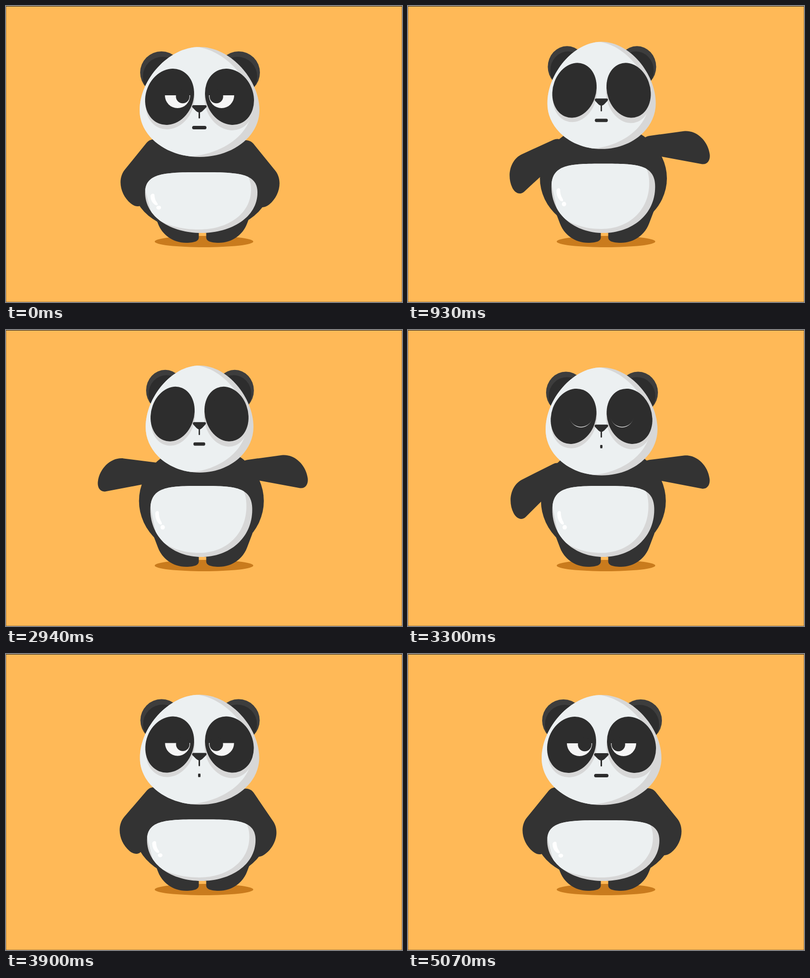
An HTML page for the animation above (6.3 s loop, 800x600 px).

```html
<!DOCTYPE html>
<html lang="en">
<head>
<meta charset="utf-8">
<title>Panda</title>
<style>
  html, body { margin: 0; width: 100%; height: 100%; overflow: hidden; background: #ffb957; }
  svg { display: block; width: 800px; height: 600px; }
  .body { fill: #333; }
  .dark { fill: #2d2d2d; }
  .rim { fill: #3d3d3d; }
  .light { fill: #ecf0f1; }
  .white { fill: #f5f5f5; }
  .shade { fill: #d7d7d7; }
</style>
</head>
<body>
<svg viewBox="0 0 800 600">
  <defs>
    <path id="skull" d="M391 83C328 83 270 150 270 211C270 264 324 306 391 306S512 264 512 211C512 150 454 83 391 83Z"/>
    <path id="tummy" d="M394.5 337C322 337 281 338 281 378C281 428 333 460 394.5 460S508 428 508 378C508 338 467 337 394.5 337Z"/>
    <path id="leg" d="M296 412L307 441C315 463 337 480 364 480C382 480 389.5 476 389.5 469V425Z"/>
    <path id="arm" d="M0-19H70C95-19 116 6 116 34C116 46 109 55 98 52L-6 18A19 19 0 0 1 0-19Z"/>
    <ellipse id="patch" rx="48" ry="58.3" transform="rotate(21.4)"/>
    <clipPath id="skullClip"><use href="#skull"/></clipPath>
    <clipPath id="tummyClip"><use href="#tummy"/></clipPath>
    <g id="ear">
      <circle cx="314" cy="135" r="43" class="rim"/>
      <circle cx="316.500" cy="143" r="40" class="dark"/>
    </g>
    <g id="eye">
      <use href="#patch" x="330.500" y="184" class="dark"/>
      <path d="M321 181H372A25.5 26 0 0 1 321 181Z" class="white"/>
      <circle cx="357" cy="183.500" r="13.700" class="dark"/>
      <ellipse class="lid dark" cx="346.500" cy="180.500" rx="26.500"/>
    </g>
  </defs>

  <rect width="800" height="600" fill="#ffb957"/>
  <path d="M.5 0V600M799.5 0V600M0 599.5H800" stroke="#000" stroke-opacity=".25"/>
  <path d="M0 .5H800" stroke="#222"/>

  <ellipse cx="400" cy="477.500" rx="99.500" ry="11.500" fill="#c97b1d"/>
  <g class="body">
    <use href="#leg"/>
    <use href="#leg" transform="translate(794) scale(-1 1)"/>
    <use href="#arm" id="armLeft"/>
    <use href="#arm" id="armRight"/>
  </g>

  <g id="torso">
    <ellipse cx="394.750" cy="363" rx="139" ry="97" class="body"/>
    <use href="#tummy" class="shade"/>
    <path clip-path="url(#tummyClip)" class="light"
      d="M480 330C490 345 495 355 495 372C495 420 450 453 390 453C355 453 320 445 295 425L270 330Z"/>
    <path fill="#fff" d="M292 386C291 381 299 378 300 383C300 391 303 396 306 400C308 404 305 405 301 403C295 399 292 392 292 386Z"/>
    <ellipse cx="308.500" cy="408.700" rx="4.800" ry="4" fill="#fff"/>
  </g>

  <g id="head">
    <use href="#ear"/>
    <use href="#ear" transform="translate(784) scale(-1 1)"/>
    <use href="#skull" class="shade"/>
    <g clip-path="url(#skullClip)">
      <path class="light" d="M386 83C438 89 497 145 497 205C497 258 439 300 372 305L260 310V70Z"/>
      <use href="#patch" x="331.500" y="193" class="shade"/>
      <use href="#patch" class="shade" transform="translate(450.5 195) scale(-1 1)"/>
    </g>
    <use href="#eye"/>
    <use href="#eye" transform="translate(782) scale(-1 1)"/>
    <path class="dark" d="M379 201H402C406 201 406 204 404 206L397 213Q390.5 219 384 213L377 206C375 204 376 201 379 201Z"/>
    <path d="M390.5 214V226.5" stroke="#2d2d2d" stroke-width="3" stroke-linecap="round"/>
    <rect id="mouth" y="243" height="7" ry="3.500" class="dark"/>
  </g>
</svg>
<script>
const LOOP = 6300, STEP = 30;
const $ = id => document.getElementById(id);
const lids = document.querySelectorAll('.lid');

const ramp = (t, start, length) => Math.min(1, Math.max(0, (t - start) / length));
const ease = (t, start, length) => {
  const u = ramp(t, start, length);
  return u * u * (3 - 2 * u);
};

// Damped spring let go at `start`: swings from 1 to rest at 0.
function spring(t, start, speed, damping) {
  const x = Math.max(0, t - start) * speed;
  return Math.exp(-damping * x) * (Math.cos(x) + damping * Math.sin(x));
}

const mix = (a, b, u) => a + (b - a) * u;
const place = (id, transform) => $(id).setAttribute('transform', transform);
const scaleAbout = (x, y, sx, sy, dy = 0) =>
  `translate(${x} ${y + dy}) scale(${sx} ${sy}) translate(${-x} ${-y})`;

function draw(t) {
  // Every part is eased up into the stretch, then springs back.
  const stretch = ease(t, 510, 570);
  const wide = stretch * spring(t, 3504, .0159, .16);
  const tall = stretch * spring(t, 3539, .0053, .73);
  const head = ease(t, 440, 566) * spring(t, 3070, .00225, 2);
  const left = ease(t, 480, 960) * spring(t, 2940, .0013, 4);
  const right = ease(t, 150, 690) * spring(t, 3280, .006, .73);

  place('head', scaleAbout(391, 83, 1 - .1 * head, 1 - .027 * head, -11 * head));
  place('torso', scaleAbout(394.75, 460, 1 - .093 * wide, 1 + .171 * tall));
  place('armLeft', `translate(${mix(299, 305, left)} ${mix(289, 288, left)}) scale(-1 1) rotate(${mix(51, -7.2, left)})`);
  place('armRight', `translate(${mix(485, 490, right)} ${mix(291, 282, right)}) rotate(${mix(51, -7.7, right)})`);

  const closed = ease(t, 570, 240) - ease(t, 3240, 300);
  lids.forEach(lid => lid.setAttribute('ry', 28 * closed));

  const pout = ramp(t, 2910, 300) - ramp(t, 4770, 300);
  const width = mix(29, 5, pout);
  $('mouth').setAttribute('x', 390.5 - width / 2);
  $('mouth').setAttribute('width', width);
  $('mouth').setAttribute('rx', width * .12);
}

function tick() {
  const t = performance.now() % LOOP;
  draw(Math.floor(t / STEP) * STEP);
  requestAnimationFrame(tick);
}
tick();
</script>
</body>
</html>
```
